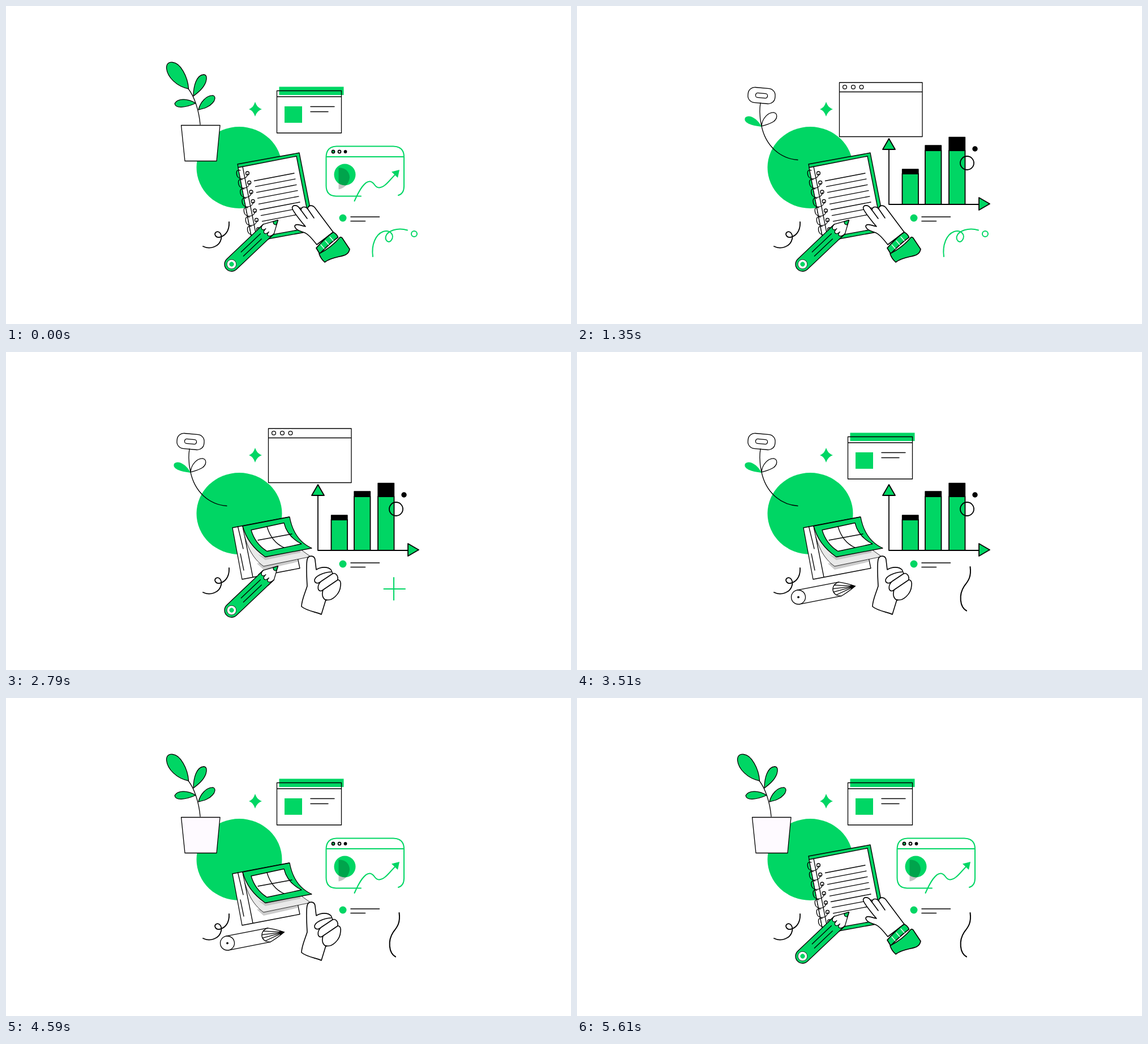
These frames come from a looping animation (998x561 px, 5.85 s). An HTML page without scripts:

```html
<!DOCTYPE html>
<html lang="en">
<head>
<meta charset="utf-8">
<title>Desk doodles</title>
<style>
html, body { margin: 0; height: 100%; overflow: hidden; background: #fff; }
svg { display: block; width: 100vw; height: 100vh; fill: none; stroke: #000; stroke-width: 1.3; stroke-linejoin: round; stroke-linecap: round; }
.g { fill: #00d664; }
.w { fill: #fff; }
.k { fill: #000; }
.n { stroke: none; }
.gl { stroke: #00d664; stroke-width: 2; }
.gl.thin { stroke-width: 1.3; }
.b { stroke-width: 1.8; }
.pot { fill: currentColor; }
.white { color: #fff; }
.tint { color: #fefaff; }

/* each drawing shows and hides in hard steps */
.s { visibility: hidden; animation: 5.85s step-end infinite; }
@keyframes plant { 0% { visibility: visible } 5.12%, 100% { visibility: hidden } }
@keyframes plant2 { 0% { visibility: hidden } 78.46%, 100% { visibility: visible } }
@keyframes sprout { 0%, 15.38%, 78.46%, 100% { visibility: hidden } 5.12%, 75.38% { visibility: visible } }
@keyframes flower { 0%, 75.38%, 100% { visibility: hidden } 15.38% { visibility: visible } }
@keyframes card { 0%, 59.99%, 100% { visibility: visible } 17.94% { visibility: hidden } }
@keyframes pane { 0%, 59.99%, 100% { visibility: hidden } 17.94% { visibility: visible } }
@keyframes graph { 0%, 70.25%, 100% { visibility: visible } 23.07% { visibility: hidden } }
@keyframes bars { 0%, 70.25%, 100% { visibility: hidden } 23.07% { visibility: visible } }
@keyframes book { 0%, 95.89%, 100% { visibility: visible } 28.2% { visibility: hidden } }
@keyframes sheet { 0%, 38.46%, 95.89%, 100% { visibility: hidden } 28.2%, 90.76% { visibility: visible } }
@keyframes pad { 0%, 90.76%, 100% { visibility: hidden } 38.46% { visibility: visible } }
@keyframes cuff { 0%, 87.69%, 100% { visibility: visible } 41.02% { visibility: hidden } }
@keyframes point { 0%, 84.61%, 100% { visibility: hidden } 41.02% { visibility: visible } }
@keyframes pinch { 0%, 87.69%, 100% { visibility: hidden } 84.61% { visibility: visible } }
@keyframes curl { 0% { visibility: visible } 44.61%, 100% { visibility: hidden } }
@keyframes plus { 0%, 53.84%, 100% { visibility: hidden } 47.69% { visibility: visible } }
@keyframes wave { 0% { visibility: hidden } 53.84%, 100% { visibility: visible } }
@keyframes pencil { 0%, 81.53%, 100% { visibility: visible } 56.92% { visibility: hidden } }
@keyframes crayon { 0%, 81.53%, 100% { visibility: hidden } 56.92% { visibility: visible } }
</style>
</head>
<body>
<svg viewBox="0 0 998 561">
  <defs>
    <g id="potted">
      <path d="M322 146C333 160 341 185 343 209"/>
      <g class="g">
        <path d="M322.500 146C301 142 285 125 283.500 110C283 101 289 98 295 99.500C308 101 321 124 322.500 146Z"/>
        <path d="M331 159C331 142 336 122 349 121C355 121 355 128 353 134C349 145 340 152 331 159Z"/>
        <path d="M335 171.500C322 163 303 162 298 172C299 181 316 180 335 171.500Z"/>
        <path d="M340 183C343 170 354 157 366 158C371 160 369 167 365 171C358 179 349 181 340 183Z"/>
      </g>
      <path class="pot" d="M309.500 210.500H378L372 273.500H316Z"/>
    </g>
    <g id="ring">
      <circle cx="426.500" cy="295" r="3"/>
      <path d="M427 296C426 306 411 308 408 299C406 292 408 288 414 290"/>
    </g>
    <path id="rule" d="M438.500 308.500L509 295"/>
  </defs>

  <ellipse class="g n" cx="412" cy="285" rx="75.500" ry="72"/>

  <g class="s white" style="animation-name:plant"><use href="#potted"/></g>
  <g class="s tint" style="animation-name:plant2"><use href="#potted"/></g>
  <g class="s white" style="animation-name:sprout"><use href="#potted" transform="translate(26 53) scale(.95 .81)"/></g>

  <g class="s" style="animation-name:flower">
    <g transform="rotate(5 326 158)">
      <rect x="302" y="144.500" width="48" height="27" rx="12"/>
      <rect x="315.500" y="154" width="21" height="8" rx="3.500"/>
    </g>
    <path d="M324 171C322 185 322 196 326 212C333 245 357 269 390 271.500"/>
    <path class="g n" d="M326 213C319 198 303 190 297 197C293 206 308 211 326 213Z"/>
    <path d="M326 212C327 198 338 187 348 188C355 190 354 199 347 204C339 209 332 210 326 212Z"/>
  </g>

  <path class="g n" d="M440 169C442.500 176 446 180 452 182C446 184.500 442.500 188 440 195C437.500 188 435 184.500 429 182C435 180 437.500 176 440 169Z"/>

  <g class="s" style="animation-name:card">
    <path class="g n" d="M482.500 142.500H596.500V157H482.500ZM492 177H523V206H492Z"/>
    <path d="M478.500 149.500H592.500V224H478.500ZM478.500 160H592.500M538 177.500H580M538 186.500H569"/>
  </g>
  <g class="s" style="animation-name:pane">
    <path d="M463.500 135H610V230.500H463.500ZM463.500 151.500H610"/>
    <circle cx="473" cy="143" r="3.400"/><circle cx="488" cy="143" r="3.400"/><circle cx="502.500" cy="143" r="3.400"/>
  </g>

  <g class="s" style="animation-name:graph">
    <path class="gl" d="M627 335.500H583Q565.500 335 565.500 317V266Q566 248 584 247.500H684Q703 248 703 266V318Q703 331 693 334M565.500 266H703"/>
    <g class="b">
      <circle class="g" cx="578" cy="257" r="2.500"/><circle cx="589" cy="257" r="2.500"/><circle class="k" cx="599.500" cy="257" r="2"/>
    </g>
    <circle class="g n" cx="598.500" cy="297.500" r="19"/>
    <path class="k n" opacity=".23" d="M587.500 285.500C603 285 607 296 607 303C605 316 596 322 587.500 323.500Z"/>
    <path class="gl" d="M615.500 344C624 325 633 309 643 309.500C652 311 650 320 659 320.500C670 320 678 306 689 296"/>
    <path class="g n" d="M695 289L681 292.500L692 303Z"/>
  </g>
  <g class="s" style="animation-name:bars">
    <path class="b" d="M551 253V350H710"/>
    <path class="g b" d="M551 234L540 253H562ZM729 349L710 338V360Z"/>
    <path class="g b" d="M574.500 350V296H603V350ZM615 350V255H643.500V350ZM657 350V255H685.500V350Z"/>
    <path class="k" d="M574.500 288H603V296H574.500ZM615 246H643.500V255H615ZM657 231.500H685.500V255H657Z"/>
    <circle class="b" cx="689" cy="277" r="12"/>
    <circle class="k n" cx="703" cy="252" r="4.700"/>
  </g>

  <circle class="g n" cx="595" cy="374" r="6.500"/>
  <path d="M609 372H659.500M609 379.500H634.500" stroke-width="1.600"/>
  <path class="b" d="M394 381C395 398 386 406 377 408C370 409 367 402 371 399C376 396 382 402 380 411C377 425 360 430 348 424"/>

  <g class="s" style="animation-name:book">
    <path class="g" d="M409 279L518 259L545 396L435 416Z"/>
    <path class="w" d="M410 285L513 265L538 391L434 410Z"/>
    <path d="M418 283.500L442 405"/>
    <use href="#ring"/>
    <use href="#ring" x="3.200" y="16.500"/>
    <use href="#ring" x="6.500" y="33"/>
    <use href="#ring" x="9.700" y="49.500"/>
    <use href="#ring" x="13" y="66"/>
    <use href="#ring" x="16" y="82.500"/>
    <use href="#ring" x="19.200" y="99"/>
    <use href="#rule"/>
    <use href="#rule" x="2" y="10.200"/>
    <use href="#rule" x="4" y="20.400"/>
    <use href="#rule" x="6" y="30.600"/>
    <use href="#rule" x="8" y="40.800"/>
    <use href="#rule" x="10" y="51"/>
    <use href="#rule" x="12" y="61.200"/>
    <use href="#rule" x="14" y="71.400"/>
  </g>

  <g class="s" style="animation-name:sheet">
    <path fill="#ccc" fill-opacity=".65" stroke="none" d="M420 302L486 289L430 306C440 335 455 350 468 380L453 381C447 350 425 330 420 302Z"/>
    <path class="gl thin" d="M437 352C442 362 445 372 448 382L468 378"/>
    <path class="w" d="M430.500 305.500L500 292C507 320 520 346 536 366L530 379L479 389L468 380C458 350 438 335 430.500 305.500Z"/>
    <path class="gl thin" d="M473 379C482 366 489 368 494 374C508 386 508 352 526 349"/>
    <path class="g" d="M469 380C462 350 466 322 479 316C497 313 490 336 502 335C510 333 505 323 511 319C517 332 511 338 507 352C503 359 498 360 494 354C484 357 470 360 469 380Z"/>
  </g>

  <g class="s" style="animation-name:pad">
    <path class="w" d="M400 310L500 291L519 381.500L417 401Z"/>
    <path d="M409.500 308L419 347M418 307L436 397M414 356L420 385"/>
    <path fill="#ccc" stroke="none" d="M443 373L455 384L516 370L512 363Z"/>
    <path fill="#e9e9e9" stroke-width=".8" d="M418 307C423 340 435 364 455 378L538 361L520 348L458 362Z"/>
    <path fill="#c4c4c4" stroke="none" d="M445 357L458 367L520 354L520 349L458 362Z"/>
    <path class="g" d="M418 307L501 291C506 318 520 337 540 346L458 361.500C437 347 424 330 418 307Z"/>
    <path class="w" d="M433 314L491 301.500C495 318 505 330 522 338.500L461 351.500C446 342 437 328 433 314Z"/>
    <path d="M461 308C466 325 475 338 491 345M445 332L505 321"/>
  </g>

  <g class="w" stroke-width="1.600">
    <g class="s" style="animation-name:cuff">
      <path d="M549 421C541 411 533 401 525 399C518 397 510 394 510 388C512 383 520 387 529 389L523 382C517 374 506 362 505.500 356C507 350 514 351 518 356L521 360C522 353 529 353 533 358C533 352 540 350 545 355L578 399Z"/>
      <path d="M518 356L532 375M533 358L544 374"/>
      <path class="g" d="M548 427C558 416 567 406 578 399Q584 402 586.500 408C574 417 564 427 554 437Z"/>
      <path stroke="#fff" stroke-width="1.200" d="M556 421L562 428M564 414L570 421M572 407L578 414"/>
      <path class="g" d="M553 437C567 430 580 420 590 408Q593 407 595 411L607 429C604 446 582 438 563 452Q556 446 553 437Z"/>
    </g>
    <g class="s" style="animation-name:point">
      <path d="M532 413C531 395 530 375 532 366C534 358 545 358 546 367L548 384C556 379 568 378 574 384L577 391C582 389 587 394 586 402C590 402 592 406 591 412C590 427 576 440 565 437L557 463C550 459 531 457 522 449C522 438 528 426 532 413Z"/>
      <path fill="none" d="M574 388C560 389 547 395 545 402C545 409 552 409 556 405L577 391M556 405C548 414 551 424 558 421L586 402M560 420C557 429 560 436 566 438"/>
    </g>
    <g class="s" style="animation-name:pinch">
      <path d="M548 430C536 424 519 412 518 405C519 400 526 404 531 407C523 399 523 392 530 385L524 379C528 369 538 362 544 364C550 367 547 373 541 378L546 380C548 372 557 372 559 382C561 394 565 402 569 409L595 442L569 461Z"/>
      <path fill="none" d="M541 378C535 382 533 389 530 390M546 380C549 391 543 395 538 389C534 385 540 378 546 380M531 407L536 411M546 388C548 396 555 399 559 394"/>
    </g>
  </g>

  <g class="s" style="animation-name:pencil">
    <g transform="translate(398.500 455.500) rotate(-43.500)">
      <path class="w" d="M89-12.700L113 0L91 12.700H77V-12.700Z"/>
      <path class="g" d="M113 0L105-4Q101 0 105 4Z"/>
      <path class="g" d="M0-12.500H89C79-12 79-4 87-4C77-4 77 4 87 4C79 4 79 12 91 12.500H0A12.500 12.500 0 0 1 0-12.500Z"/>
      <path d="M27-4H74M25 4H69"/>
      <circle class="w" r="8.300" stroke-width=".7"/>
      <circle class="g n" r="4"/>
    </g>
  </g>
  <g class="s" style="animation-name:crayon">
    <g transform="translate(391 432.500) rotate(-11)">
      <path class="w" d="M0-12.500H75Q88-8 102 0Q88 8 75 12.500H0Z"/>
      <path d="M75-12.500C58-10 58 10 75 12.500M66-9L102 0L63-3M63 3L102 0L66 9"/>
      <path class="k" d="M95-3.500L102 0L95 3.500Z"/>
      <circle class="w" r="12.500"/>
      <circle class="k n" r="1.900"/>
    </g>
  </g>

  <g class="s gl" style="animation-name:curl">
    <path d="M648 442C645 421 653 403 666 398C678 394 688 404 680 414C675 419 669 413 671 406C674 397 691 390 709 395.500"/>
    <circle cx="721" cy="402" r="5"/>
  </g>
  <path class="s gl" style="animation-name:plus" d="M685 398V437.500M667.500 418H705"/>
  <path class="s" stroke-width="2" style="animation-name:wave" d="M694.500 379C697 398 690 405 684 413C674 428 676 450 688 456.500"/>
</svg>
</body>
</html>
```
